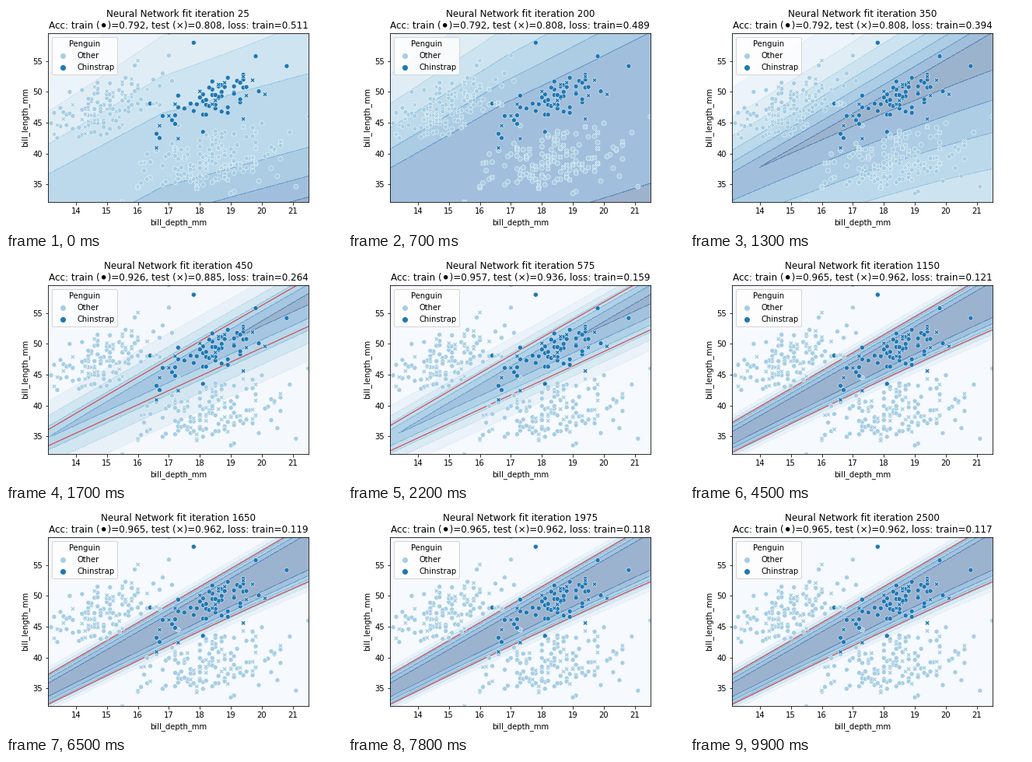
Recreate the animation shown at these times as a matplotlib script. Size 432 px wide and 288 px high, loop 10 s.

```python
import numpy as np
import matplotlib.pyplot as plt
from matplotlib.animation import FuncAnimation

plt.rcParams.update({
    "font.family": "DejaVu Sans",
    "font.size": 10,
    "figure.subplot.left": 0.125,
    "figure.subplot.right": 0.9,
    "figure.subplot.bottom": 0.125,
    "figure.subplot.top": 0.88,
})

FRAMES, INTERVAL, STEP = 100, 100, 25
X_LIM, Y_LIM = (13.1, 21.5), (32.1, 59.6)
OTHER, CHINSTRAP = "#a6cee3", "#1f78b4"
N_TRAIN, N_TEST = 231, 78

rng = np.random.default_rng(8)


# --- data -----------------------------------------------------------------

def in_band(pts):
    depth, length = pts.T
    d = depth - X_LIM[0]
    return (length > 32.4 + 2.37 * d) & (length < 37.2 + 2.93 * d)


def cluster(n, mean, sd, corr, low, high, banded=False):
    """Correlated (depth, length) pairs, kept inside or outside the band."""
    cross = corr * sd[0] * sd[1]
    cov = [[sd[0] ** 2, cross], [cross, sd[1] ** 2]]
    pts = rng.multivariate_normal(mean, cov, 8 * n).round(1)
    keep = ((pts >= low) & (pts <= high)).all(axis=1)
    return pts[keep & (in_band(pts) == banded)][:n]


adelie = cluster(144, (18.3, 38.8), (1.2, 2.6), .35, (15.9, 33.5), (21.2, 45))
gentoo = cluster(120, (15, 47.4), (.97, 2.7), .6, (13.2, 42), (17.2, 53))
others = rng.permutation(np.vstack([adelie, gentoo]))
chins = cluster(60, (18.5, 49), (1.1, 2.8), .65, (16.5, 44.5), (20.3, 53.5), True)

# Birds well away from their group.
far_others = [(17, 59.6), (17, 55.9), (15.9, 54.3), (21.5, 46), (21.1, 34.6),
              (19, 33.5), (17.3, 44.5)]
far_chins = [(17.8, 58), (19.8, 55.8), (20.8, 54.2), (16.4, 48.1),
             (18.1, 43.5), (16.6, 43.2), (16.7, 42.5)]
far_others_test = [(16, 55.1), (15.5, 32.1)]
far_chins_test = [(16.6, 40.9), (17.3, 42.4), (19.4, 45.6)]


# --- model ----------------------------------------------------------------

xs = np.linspace(*X_LIM, 253)
ys = np.linspace(*Y_LIM, 166)
U, Y = np.meshgrid(np.linspace(0, 1, len(xs)), ys)


def across(ends):
    return ends[0] + (ends[1] - ends[0]) * U


def early():
    """Kinked slope: falls linearly above the kink, rises gently below."""
    d = Y - np.minimum(36.65 + 22.6 * U, 41.5 + 11.5 * U)
    up, down = np.maximum(d, 0), np.maximum(-d, 0)
    return -1.516 - across((.0295, .0165)) * up + .0009 * down ** 2


def ridge(crest, peak, above, below):
    """Tent along a crest line; each pair is the value at left and right."""
    d = Y - across(crest)
    return across(peak) - np.where(d > 0, across(above) * d, -across(below) * d)


# Logit surfaces passed through as the training loss falls.
stage_loss = np.array([.118, .159, .394, .511])
surfaces = [
    ridge((34.64, 57.45), (4.02, 5.96), (1.57, 1.37), (1.76, 1.16)),
    ridge((34.75, 57.4), (1.07, 2.66), (.55, .72), (.5, .52)),
    ridge((35.4, 57.9), (-.345, -.1), (.158, .1265), (.075, .0514)),
    early(),
]


def loss_at(it):
    drop = .3693 / (1 + np.exp((it - 411.4) / 69.04))
    return .117 + .004 * np.exp((1150 - it) / 600) + drop


def probability(loss):
    pos = np.interp(loss, stage_loss, range(len(surfaces)))
    k = min(int(pos), len(surfaces) - 2)
    w = pos - k
    return 1 / (1 + np.exp(-(1 - w) * surfaces[k] - w * surfaces[k + 1]))


def accuracy(loss):
    gain = np.clip((.39 - loss) / .269, 0, 1)
    return (round(183 + 40 * gain ** (1 / 3)) / N_TRAIN,
            round(63 + 12 * gain) / N_TEST)


# --- figure ---------------------------------------------------------------

fig, ax = plt.subplots(figsize=(6, 4), dpi=72)
ax.set(xlim=X_LIM, ylim=Y_LIM, xlabel="bill_depth_mm", ylabel="bill_length_mm")
title = ax.set_title("")


def scatter(light, dark, marker):
    pts = np.vstack([light, dark])
    colors = np.repeat([OTHER, CHINSTRAP], [len(light), len(dark)])
    order = rng.permutation(len(pts))
    ax.scatter(*pts[order].T, s=36, c=colors[order], marker=marker,
               edgecolors="white", linewidths=.48, zorder=2.2)


scatter(np.vstack([others[61:], far_others]), np.vstack([chins[12:], far_chins]), "o")
scatter(np.vstack([others[:61], far_others_test]),
        np.vstack([chins[:12], far_chins_test]), "X")
handles = [ax.scatter([], [], s=36, color=c, label=name)
           for name, c in (("Other", OTHER), ("Chinstrap", CHINSTRAP))]
ax.legend(handles=handles, title="Penguin", loc="upper left")

layers = []


def draw(i):
    while layers:
        layers.pop().remove()
    it = STEP * (i + 1)
    loss = loss_at(it)
    p = probability(loss)
    layers.append(ax.contourf(xs, ys, p, cmap="Blues", alpha=.4, zorder=1))
    if p.max() > .5:
        layers.append(ax.contour(xs, ys, p, levels=[.5], colors="#d62728",
                                 linewidths=1.1, alpha=.85, zorder=2))
    train, test = accuracy(loss)
    title.set_text(f"Neural Network fit iteration {it}\n"
                   f"Acc: train (\u26ab)={train:.3f}, test (×)={test:.3f}, "
                   f"loss: train={loss:.3f}")
    return []


anim = FuncAnimation(fig, draw, frames=FRAMES, interval=INTERVAL,
                     init_func=lambda: [], repeat=True, repeat_delay=0)
plt.show()
```
